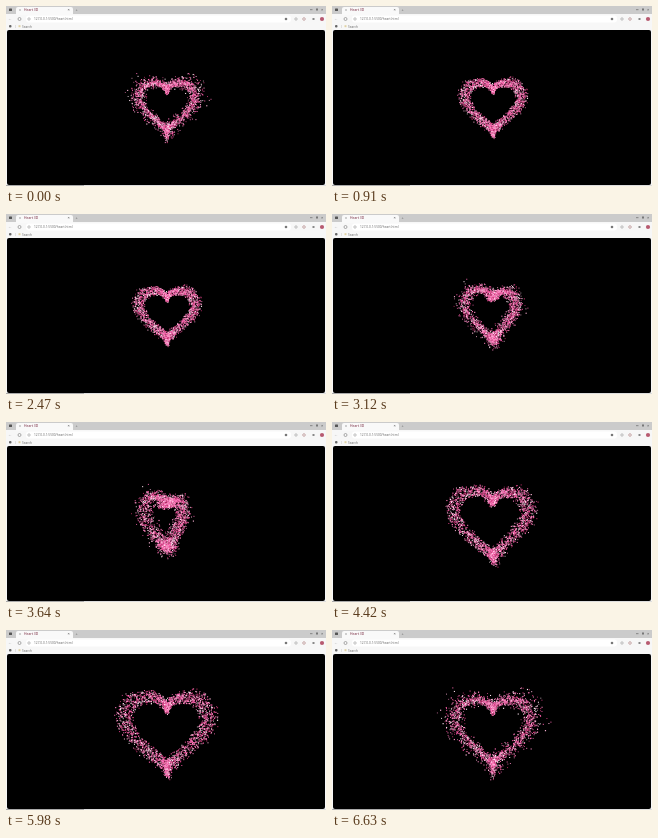
An HTML page with a canvas for the animation above (6.76 s loop, 320 by 180 pixels).

```html
<!DOCTYPE html>
<html lang="en">
<head>
<meta charset="utf-8">
<title>Heart 3D</title>
<style>
  html, body { margin: 0; width: 100%; height: 100%; overflow: hidden; background: #eee; }
  canvas { display: block; width: 320px; height: 180px; }
</style>
</head>
<body>
<canvas id="stage" width="320" height="180"></canvas>
<script>
const ctx = document.getElementById('stage').getContext('2d');
const LOOP = 6760, STEP = 130, BEAT = 1690;
const CENTER = { x: 161, y: 97 };
const CAMERA = 75;
const COLORS = ['#ff69b4', '#f45ca6', '#ff8cc6', '#d93f85', '#ffb6d9', '#a82a5e', '#ffe6f2', '#f878b8'];

// Keys are [time, value]
const ZOOM = [[0, 1.69], [2600, 1.69], [3640, 1.76], [5070, 2.69], [5980, 2.5], [6760, 2.26]];
const YAW = [[0, 0], [2470, 0], [3640, 0.9], [4810, 0.03], [5980, 0.07], [6760, 0]];

function seeded(seed) {
  return () => {
    seed = (seed + 0x6d2b79f5) | 0;
    let n = Math.imul(seed ^ (seed >>> 15), 1 | seed);
    n = (n + Math.imul(n ^ (n >>> 7), 61 | n)) ^ n;
    return ((n ^ (n >>> 14)) >>> 0) / 4294967296;
  };
}

function keyed(keys, time) {
  const i = keys.findIndex(key => key[0] > time);
  const [t0, v0] = keys[i - 1], [t1, v1] = keys[i];
  const p = (time - t0) / (t1 - t0);
  return v0 + (v1 - v0) * p * p * (3 - 2 * p);
}

function heartPoint(a) {
  return {
    x: 16 * Math.sin(a) ** 3,
    y: 1.03 * (13 * Math.cos(a) - 4 * Math.cos(2 * a) - 2 * Math.cos(3 * a) - 0.5 * Math.cos(4 * a))
  };
}

const random = seeded(214);
const particles = Array.from({ length: 2700 }, () => {
  const point = heartPoint(random() * Math.PI * 2);
  const spread = -Math.log(1 - random() * 0.985);
  const outward = random() < 0.68;
  const rest = 1 + (outward ? 0.125 : -0.06) * spread;
  const swell = 0.88 + 0.36 * Math.pow(random(), 1.15);
  return {
    ...point, rest, swell,
    jitterX: (random() - 0.5) * 1.6,
    jitterY: (random() - 0.5) * 1.6,
    z: (random() + random() - 1) * 7,
    size: 0.75 + random() * 0.4,
    color: COLORS[Math.floor(random() * COLORS.length)]
  };
});

function rect(x, y, w, h, color, radius = 0) {
  ctx.fillStyle = color;
  ctx.beginPath();
  ctx.roundRect(x, y, w, h, radius);
  ctx.fill();
}

function dot(x, y, r, color) {
  ctx.fillStyle = color;
  ctx.beginPath();
  ctx.arc(x, y, r, 0, Math.PI * 2);
  ctx.fill();
}

function ring(x, y, r, color) {
  ctx.strokeStyle = color;
  ctx.lineWidth = 0.6;
  ctx.beginPath();
  ctx.arc(x, y, r, 0, Math.PI * 2);
  ctx.stroke();
}

function label(text, x, y, size, color) {
  ctx.font = `${size}px "Open Sans", sans-serif`;
  ctx.fillStyle = color;
  ctx.fillText(text, x, y);
}

function drawBrowser() {
  rect(0, 0, 320, 180, '#f7f7f7');
  rect(0, 0, 320, 8, '#cbcbcb');
  rect(10, 1, 57, 8, '#f9f9f9', [2, 2, 0, 0]);
  rect(3, 2.5, 3, 2.5, '#555', 0.5);
  dot(14, 4, 0.9, '#bbb');
  label('Heart 3D', 18, 5.2, 3.4, '#701c34');
  label('×', 61.5, 5.2, 4, '#333');
  label('+', 69.5, 5.2, 4, '#666');
  rect(304, 3.5, 2.5, 0.6, '#555');
  rect(310, 2.5, 2, 2, '#777');
  label('×', 315, 5.2, 4, '#444');

  rect(20, 9.5, 265, 7, '#fff', 3);
  label('←', 2, 14.4, 4, '#aaa');
  ring(13.5, 13, 1.5, '#777');
  ring(23, 13, 1.2, '#999');
  label('127.0.0.1:5500/heart.html', 28, 14.4, 3.2, '#666');
  dot(280, 13, 1.3, '#777');
  ring(290, 13, 1.2, '#999');
  ring(298, 13, 1.3, '#a77');
  rect(306.5, 12, 2, 2, '#888');
  dot(316, 13, 2.1, '#b75a70');

  rect(3, 19, 2.5, 2.5, '#666', 1);
  rect(9, 19, 0.5, 3, '#ccc');
  rect(12.5, 19.2, 2, 2, '#e0d2a4');
  label('Search', 16, 21.6, 3.2, '#666');

  rect(1, 24, 318, 155, '#000', 2);
  rect(0, 179, 320, 1, '#ddd');
  rect(0, 179, 78, 1, '#aaa');
}

function drawHeart(time) {
  const zoom = keyed(ZOOM, time), yaw = keyed(YAW, time);
  const pulse = (1 - Math.cos(time / BEAT * Math.PI * 2)) / 2;
  const cos = Math.cos(yaw), sin = Math.sin(yaw);
  for (const p of particles) {
    const reach = p.rest + (p.swell - p.rest) * pulse;
    const x = p.x * reach + p.jitterX;
    const y = p.y * reach + p.jitterY;
    const depth = p.z * cos - x * sin;
    const scale = zoom * CAMERA / (CAMERA - depth);
    const px = CENTER.x + (x * cos + p.z * sin) * scale;
    const py = CENTER.y - y * scale;
    const size = p.size * (0.85 + zoom * 0.09);
    ctx.fillStyle = p.color;
    ctx.fillRect(px - size / 2, py - size / 2, size, size);
  }
}

function frame(now) {
  const time = Math.floor((now % LOOP) / STEP) * STEP;
  drawBrowser();
  drawHeart(time);
  requestAnimationFrame(frame);
}
requestAnimationFrame(frame);
</script>
</body>
</html>
```
